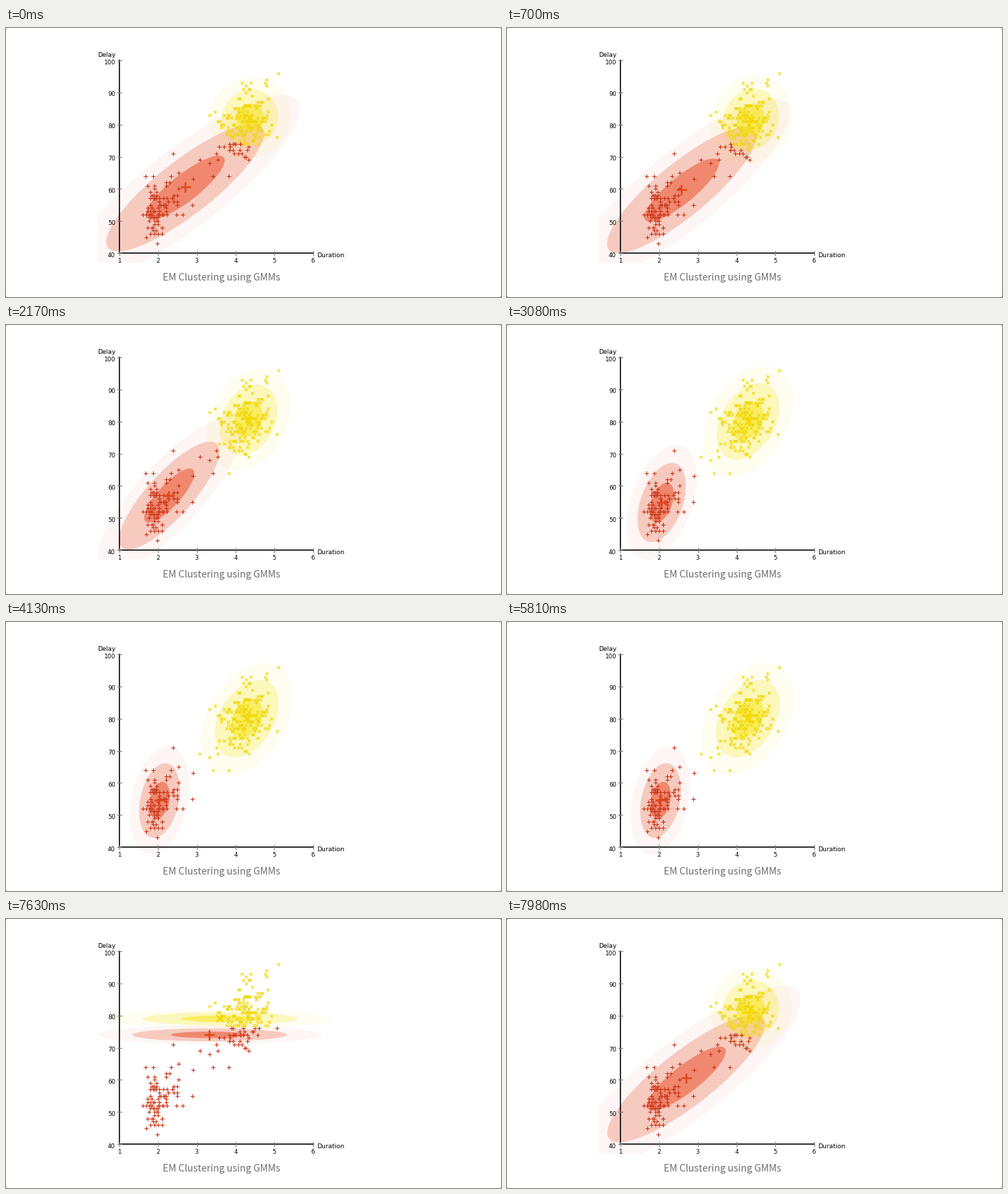
Write a matplotlib script that moves like this. It is 720 px wide and 392 px high and loops after 8000 ms.

```python
import numpy as np
import matplotlib.pyplot as plt
from matplotlib.animation import FuncAnimation
from matplotlib.patches import FancyBboxPatch, Polygon, Rectangle

W, H, DPI = 720, 392, 100
LOOP, INTERVAL, STEP = 8000, 40, 70
RESET, RESTART = 7280, 7840
PX = 72 / DPI  # points per pixel

RED, YELLOW = np.array([231, 64, 24]) / 255, np.array([248, 228, 12]) / 255

# Each cluster: mean x, mean y, sd x, sd y, correlation
FLAT = np.array([[3.33, 74, 1, 1, 0], [3.6, 79, 1, 1, 0]])
WIDE = np.array([[2.70, 60.4, 1.02, 9.93, .85], [4.37, 82.1, .365, 4.4, .05]])
FINAL = np.array([[2.036, 54.5, .263, 5.8, .285], [4.29, 79.97, .412, 6.0, .38]])
# How late each value moves on the way from WIDE to FINAL
EASE = np.array([[1, 1.15, 1.5, 2.1, 6], [2, .7, 4, .8, .9]])

OUTLIERS = [(5.1, 96), (4.8, 94), (5.07, 76), (3.32, 83), (3.07, 69), (3.33, 68),
            (3.42, 64), (3.83, 64), (2.38, 71), (2.9, 63), (2.88, 55), (1.6, 52),
            (1.98, 43), (1.67, 64)]


def to_px(x, y):
    return 165 + (np.asarray(x) - 1) * 56.3, 328 - (np.asarray(y) - 40) * 4.683


def inside(x, y, low, high, n):
    """First n points within a box, on the grid of the measurements."""
    pts = np.column_stack([np.round(x * 30) / 30, np.round(y)])
    return pts[np.all((pts >= low) & (pts <= high), axis=1)][:n]


def make_points():
    rng = np.random.default_rng(7)
    u, v = rng.normal(size=(2, 900))
    x = 1.66 + rng.gamma(2.5, .14, 900)
    short = inside(x, 54.2 + 6 * (x - 2) + 5.4 * u, (1.7, 45), (2.65, 67), 91)
    mx, my, sx, sy, rho = FINAL[1]
    y = my + sy * (rho * u + np.sqrt(1 - rho ** 2) * v)
    long = inside(mx + .38 * u, y, (3.45, 69), (5.0, 93), 167)
    return np.vstack([OUTLIERS, short, long])


def log_density(pts, mx, my, sx, sy, rho):
    u, v = (pts[:, 0] - mx) / sx, (pts[:, 1] - my) / sy
    q = 1 - rho ** 2
    return -(u * u + v * v - 2 * rho * u * v) / (2 * q) - np.log(sx * sy * np.sqrt(q))


def outline(k, mx, my, sx, sy, rho):
    a = np.linspace(0, 2 * np.pi, 120)
    u, v = np.cos(a), rho * np.cos(a) + np.sqrt(1 - rho ** 2) * np.sin(a)
    return np.column_stack(to_px(mx + k * sx * u, my + k * sy * v))


def model_at(t):
    """Both clusters and the log odds in favour of red."""
    if RESET <= t < RESTART:
        return FLAT, 0
    p = 0 if t >= RESTART else np.interp(t, [0, 1470, 3080, 3850], [0, .41, .956, 1])
    return WIDE + (FINAL - WIDE) * p ** EASE, .45 - 1.05 * p


fig = plt.figure(figsize=(W / DPI, H / DPI), dpi=DPI, facecolor="#b4b4b4")
ax = fig.add_axes([0, 0, 1, 1])
ax.set_xlim(0, W)
ax.set_ylim(H, 0)
ax.axis("off")
ax.add_patch(FancyBboxPatch((0, 0), W, H, boxstyle="round,pad=0,rounding_size=3",
                            fc="white", ec="none", zorder=0))
clip = Rectangle((134, 34), 358, 308, fc="none", ec="none")
ax.add_patch(clip)


def add_marks(marker, color, size, width, z):
    return ax.plot([], [], ls="", marker=marker, color=color, ms=size * PX,
                   mew=width * PX, zorder=z)[0]


class Cluster:
    def __init__(self, color, alphas, marker, sizes, mark_color, mean_color, z):
        self.shapes = []
        for k, alpha in zip((2.9, 2, 1), alphas):
            p = Polygon([(0, 0), (1, 0), (0, 1)], fc=color, ec="none",
                        alpha=alpha, zorder=z)
            ax.add_patch(p)
            p.set_clip_path(clip)
            self.shapes.append((k, p))
        self.marks = add_marks(marker, mark_color, sizes[0], 1.1, 4)
        self.mean = add_marks(marker, mean_color, sizes[1], 2.5, 5)

    def show(self, params, pts):
        for k, patch in self.shapes:
            patch.set_xy(outline(k, *params))
        self.marks.set_data(*to_px(*pts.T))
        self.mean.set_data(*to_px(params[:1], params[1:2]))


def label(x, y, s, size=8.6, ha="center", va="center_baseline",
          family="DejaVu Sans", color="black"):
    ax.text(x, y, s, size=size * PX, ha=ha, va=va, family=family, color=color, zorder=8)


def draw_axes():
    x0, y0 = to_px(1, 40)
    x1, y1 = to_px(6, 100)
    ax.plot([x0, x0, x1], [y1, y0, y0], color="black", lw=1.6 * PX, zorder=6)
    tick = dict(color="#808080", lw=1.2 * PX, zorder=7)
    for d in range(40, 101, 10):
        y = to_px(1, d)[1]
        ax.plot([x0 - 3, x0 + 3], [y, y], **tick)
        label(159, y + 2, str(d), ha="right")
    for d in range(1, 7):
        x = to_px(d, 40)[0]
        ax.plot([x, x], [y0 - 3, y0 + 3], **tick)
        label(x, 338.3, str(d))
    label(133, 42, "Delay", 9.1, "left", "baseline")
    label(452, 334, "Duration", 9.1, "left", "baseline")
    label(227.5, 368, "EM Clustering using GMMs", 14.1, "left", "baseline",
          "Noto Sans CJK JP", "#6e6e6e")


draw_axes()
points = make_points()
red = Cluster(RED, (.045, .24, .48), "+", (6.4, 15), "#c83214", "#e0461c", 1)
yellow = Cluster(YELLOW, (.06, .23, .5), "x", (4.4, 9.5), "#f0d808", "#f2da00", 2)


def update(i):
    (a, b), odds = model_at(i * INTERVAL // STEP * STEP)
    is_red = log_density(points, *a) + odds > log_density(points, *b)
    red.show(a, points[is_red])
    yellow.show(b, points[~is_red])
    return [red.marks, yellow.marks, red.mean, yellow.mean]


anim = FuncAnimation(fig, update, frames=LOOP // INTERVAL, interval=INTERVAL,
                     repeat=True, repeat_delay=0, blit=False)
plt.show()
```
